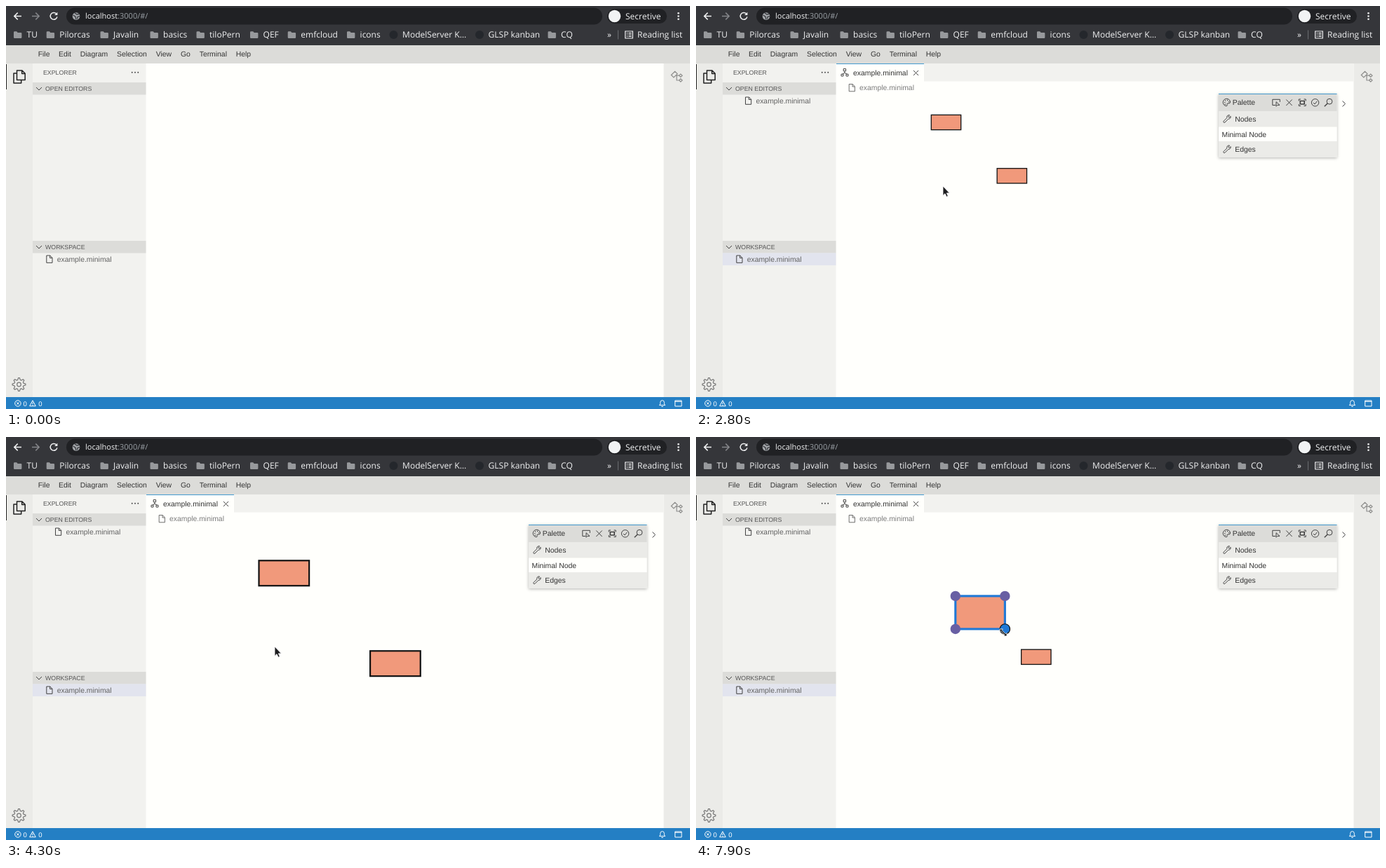
An HTML page that plays this animation: 975x575 px, repeating every 8000 ms.

```html
<!DOCTYPE html>
<html lang="en">
<head>
<meta charset="utf-8">
<title>Diagram editor</title>
<style>
  html, body { margin: 0; width: 100%; height: 100%; overflow: hidden; background: #fffffc; }
  svg.stage { display: block; width: 100vw; height: 100vh; }
  text { font: 10.4px "Liberation Sans", Arial, sans-serif; fill: #333; text-rendering: geometricPrecision; white-space: pre; }
  .chrome text { font: 12px "Open Sans", "Noto Sans", sans-serif; fill: #f1f2f3; }
  .chrome .url { font-size: 11px; }
  text.cap { font-size: 8.8px; fill: #555; }
  text.file { fill: #626262; }
  text.crumb { fill: #7c7c7c; }
  text.status { font-size: 9.6px; fill: #fff; }
  .line { fill: none; stroke: #424242; stroke-width: 1; }
  .head { fill: #dcdcd9; }
  .side { fill: #f2f2ef; }
  .bar { fill: #ebebe8; }
  .pick { fill: #e2e4ee; }
  .node { fill: #f1997b; stroke: #111; }
  .hidden { display: none; }
</style>
</head>
<body>
<svg class="stage" viewBox="0 0 975 575">
  <defs>
    <path id="folder" d="M0 1.2Q0 0 1.2 0H4.2L5.7 1.7H10.2Q11.4 1.7 11.4 2.9V8.6Q11.4 9.8 10.2 9.8H1.2Q0 9.8 0 8.6Z" fill="#97999c"/>
    <path id="page" class="line" stroke-linejoin="round" d="M.5 .5H5.5L8.7 3.7V10.8H.5ZM5.3 .7V4H8.5"/>
    <path id="chevron" class="line" d="M0 0L4 4L8 0"/>
    <g id="dots" fill="#424242"><circle r=".95"/><circle cx="4.3" r=".95"/><circle cx="8.6" r=".95"/></g>
    <path id="wrench" class="line" stroke-linejoin="round" d="M.6 9.3L5.3 4.6Q4.7 1.2 8.2 .6L9.1 .8L7.2 2.7L8.7 4.2L10.6 2.3Q11.2 5.7 7.2 6.3L2.4 11.1Q1 11.7 .4 10.7Q.2 9.9 .6 9.3Z"/>
    <filter id="shadow" x="-10%" y="-10%" width="120%" height="130%">
      <feDropShadow dx="0" dy="1" stdDeviation="2" flood-opacity=".3"/>
    </filter>
  </defs>

  <!-- browser -->
  <g class="chrome">
    <rect width="975" height="56" fill="#35363a"/>
    <rect x="86" y="2.5" width="764" height="24" rx="12" fill="#202124"/>
    <rect x="857" y="4" width="85" height="21" rx="10.5" fill="#202124"/>
    <g fill="none" stroke-width="1.5" stroke="#f1f2f3">
      <path d="M22 14.5H12M16.7 9.6L11.8 14.5L16.7 19.4"/>
      <path d="M37 14.5H47M42.3 9.6L47.2 14.5L42.3 19.4" stroke="#85868a"/>
      <path d="M71.6 10.9A4.9 4.9 0 1 0 72.9 15.4"/>
      <path d="M73.4 8.8V13.1H69.1Z" fill="#f1f2f3" stroke="none"/>
    </g>
    <circle cx="100" cy="14.5" r="5.3" fill="#a3a6aa"/>
    <path d="M95.6 13L99 15.2L99.8 18.8M98 10L101 12L104.5 11.4M101.5 18.5L102 15.5L105 14.6" fill="none" stroke="#34363a" stroke-width="1.3"/>
    <text class="url" x="113" y="18.3">localhost<tspan fill="#9aa0a6">:3000/#/</tspan></text>
    <circle cx="867.5" cy="14.5" r="8.7" fill="#f1f3f4"/>
    <text x="883" y="18.6">Secretive</text>
    <g fill="#f1f2f3"><circle cx="958.5" cy="10.3" r="1.3"/><circle cx="958.5" cy="14.5" r="1.3"/><circle cx="958.5" cy="18.7" r="1.3"/></g>
    <g id="marks"></g>
    <text x="857" y="45" font-weight="bold">»</text>
    <path d="M872.5 34.5V47.5" stroke="#6a6c70"/>
    <path d="M882.7 36H893.3V46H882.7ZM884.8 38.6H886M887.3 38.6H891.5M884.8 41H886M887.3 41H891.5M884.8 43.4H886M887.3 43.4H891.5" fill="none" stroke="#f1f2f3" stroke-width="1.2"/>
    <text x="900" y="45.2">Reading list</text>
  </g>

  <!-- workbench -->
  <rect y="56" width="975" height="26" class="head"/>
  <g id="menu"></g>
  <rect y="82" width="38" height="476" class="bar"/>
  <rect x="937.5" y="82" width="37.5" height="476" class="bar"/>
  <rect x="38" y="82" width="161.5" height="476" class="side"/>
  <path d="M.5 83V119" stroke="#222"/>
  <path d="M15.5 105.5V92H23L27.2 96.2V105.5ZM22.7 92V96.5H27M15.5 96H11V110H21.7V105.5" fill="none" stroke="#222" stroke-width="1.5" stroke-linejoin="round"/>
  <g fill="none" stroke="#777" stroke-width="1.2"><path id="gear"/><circle cx="18.5" cy="540" r="2.8"/></g>
  <path d="M948.3 98.5L953.5 93.3L957 96.8L951.8 102ZM954.6 99.2H959.5M956 99.2V106H959.5M959.5 99.2L961.7 97L964 99.2L961.7 101.4ZM959.5 106L961.7 103.8L964 106L961.7 108.2Z" fill="none" stroke="#8d8d8b" stroke-width="1.2"/>

  <text class="cap" x="53" y="97.7">EXPLORER</text>
  <use href="#dots" x="179.7" y="94.8"/>
  <rect x="38" y="109" width="161.5" height="17.5" class="head"/>
  <use href="#chevron" x="43" y="116"/>
  <text class="cap" x="56" y="121">OPEN EDITORS</text>
  <rect x="38" y="335" width="161.5" height="17.5" class="head"/>
  <use href="#chevron" x="43" y="342"/>
  <text class="cap" x="56" y="346.8">WORKSPACE</text>
  <rect id="fileRow" class="pick" x="38" y="352.5" width="161.5" height="17.5"/>
  <use href="#page" x="57.3" y="355.5"/>
  <text class="file" x="72.7" y="364.6">example.minimal</text>
  <g id="tools">
    <path class="line" d="M143.4 340.2A4.3 4.3 0 1 0 149.2 340.3M142 340H144.5V342.6"/>
    <path class="line" d="M163.2 342V339H170.3V346H168.3M161.5 341.6H168V348H161.5ZM163 344.8H166.5"/>
    <use href="#dots" x="180.7" y="343.8"/>
  </g>

  <g id="editor">
    <rect id="openRow" class="pick" x="38" y="126.5" width="161.5" height="17.5"/>
    <use href="#page" x="70" y="129.5"/>
    <text class="file" x="85.4" y="138.7">example.minimal</text>
    <rect x="325" y="82" width="612.5" height="25.5" class="side"/>
    <path d="M200 82.5H325" stroke="#439bd0"/>
    <path class="line" d="M210.2 89.6H213.6V92.8H210.2ZM211.9 93V95.3L208.8 97.2M211.9 95.3L215.2 97.2M207 97.2H210V100H207ZM214 97.2H217V100H214Z"/>
    <text x="224" y="98.6">example.minimal</text>
    <path class="line" d="M310 92L317 99M317 92L310 99"/>
    <use href="#page" x="217.7" y="111" opacity=".75"/>
    <text class="crumb" x="233" y="120.4">example.minimal</text>
  </g>

  <g id="diagram">
    <rect id="nodeB" class="node"/>
    <rect id="nodeA" class="node"/>
    <g id="handles"></g>
    <g filter="url(#shadow)">
      <rect x="745" y="125" width="168.5" height="91" class="bar"/>
    </g>
    <rect x="745" y="125" width="168.5" height="25" class="head"/>
    <rect x="745" y="172.5" width="168.5" height="20.5" fill="#fffffc"/>
    <path d="M745 125.5H913.5" stroke="#439bd0"/>
    <g class="line">
      <path d="M756.3 132.3A5.2 5.2 0 1 0 756.5 142.7Q758 142 756.8 140.6Q756.6 138.7 759 138.9Q761.6 139.2 761.6 137A5.2 5.2 0 0 0 756.3 132.3"/>
      <path d="M753.2 137.6H754.4M754 134.9H755.2M757 134.5H758.2M759 136.6H760.2M753.8 140.3H755" stroke-width="1.3"/>
      <path d="M826 141.5H821.8V133.3H832.3V137M827 136.7V143.2L828.8 141.4H832Z"/>
      <path d="M841.3 133.5L849.7 142M849.7 133.5L841.3 142"/>
      <path d="M859.3 135.5V133H862M866.5 133H869.2V135.5M869.2 140V142.5H866.5M862 142.5H859.3V140"/>
      <path d="M861.3 135.5H867.2V140H861.3Z" stroke-width="1.6"/>
      <circle cx="882.6" cy="137.8" r="5.2"/><path d="M880 138L882 140L885.4 135.8"/>
      <circle cx="903" cy="136.2" r="3.9"/><path d="M900.2 139L895.8 143.3" stroke-width="1.3"/>
      <path d="M921.5 135.5L925.5 139.5L921.5 143.5"/>
    </g>
    <text x="764.8" y="141.2">Palette</text>
    <use href="#wrench" x="751.5" y="155"/>
    <text x="768.3" y="164.8">Nodes</text>
    <text x="749.5" y="186.8">Minimal Node</text>
    <use href="#wrench" x="751.5" y="198.3"/>
    <text x="768.3" y="208.3">Edges</text>
  </g>

  <!-- status bar -->
  <rect y="558" width="975" height="17" fill="#247fc4"/>
  <g fill="none" stroke="#fff">
    <circle cx="16.9" cy="567" r="4.2"/><path d="M15.2 565.3L18.6 568.7M18.6 565.3L15.2 568.7"/>
    <path d="M38 562.8L42.3 570.8H33.7ZM38 565.5V568.2M38 569V570"/>
    <path d="M931.4 569.6H939.6L938.3 567.8V565.5A2.8 2.8 0 0 0 932.7 565.5V567.8ZM934.3 571.5H936.7"/>
    <path d="M953.7 563H963V571H953.7ZM953.7 564.3H963"/>
  </g>
  <text class="status" x="24.4" y="570.6">0</text>
  <text class="status" x="46.2" y="570.6">0</text>

  <!-- pointers -->
  <path id="arrow" d="M0 0V13.4L3 10.7L5.1 15.3L7.3 14.3L5.3 9.9H9.4Z" fill="#1d1d1f" stroke="#fff" stroke-width=".8"/>
  <path id="hand" d="M-.9 .6Q.3 -.8 1.3 .6V4.7L2.6 4.2L4 5L5.4 4.8L6.4 5.9L7.7 6.2V10L6.3 14H-.3L-4.3 9.2Q-4.8 7.8 -3.2 7.7L-.9 9.2Z" fill="#fff" stroke="#1d1d1f" stroke-width="1.1" stroke-linejoin="round"/>
  <path id="resize" d="M-5 -5H-.6L-2 -3.4L3.4 2L5 .6V5H.6L2 3.4L-3.4 -2L-5 -.6Z" fill="#111" stroke="#fff" stroke-width=".8"/>
</svg>
<script>
const LOOP = 8000, STEP = 100;
const W = 32.6, H = 16.35, GAP_X = 72.2, GAP_Y = 58.7;
const el = id => document.getElementById(id);
const show = (id, on) => el(id).classList.toggle('hidden', !on);

function add(parent, tag, attrs, content) {
  const node = document.createElementNS('http://www.w3.org/2000/svg', tag);
  set(node, attrs);
  if (content) node.textContent = content;
  return parent.appendChild(node);
}
function set(node, attrs) {
  for (const key in attrs) node.setAttribute(key, attrs[key]);
}

// static rows
[['TU', 11], ['Pilorcas', 57.7], ['Javalin', 134.5], ['basics', 205.5], ['tiloPern', 271.5], ['QEF', 348],
 ['emfcloud', 401.7], ['icons', 486], ['ModelServer K…', 546.5, 1], ['GLSP kanban', 669, 1], ['CQ', 772.5]
].forEach(([name, x, dot]) => {
  if (dot) add(el('marks'), 'circle', { cx: x + 6, cy: 41, r: 6, fill: '#24272c' });
  else add(el('marks'), 'use', { href: '#folder', x, y: 36.2 });
  add(el('marks'), 'text', { x: x + 18.6, y: 45.2 }, name);
});
[['File', 45.7], ['Edit', 75], ['Diagram', 105.8], ['Selection', 158], ['View', 213.7], ['Go', 249], ['Terminal', 275.7], ['Help', 327.7]]
  .forEach(([name, x]) => add(el('menu'), 'text', { x, y: 72.4 }, name));

const teeth = Array.from({ length: 32 }, (_, i) => {
  const a = (i - 1.5) * Math.PI / 16, r = i % 4 === 1 || i % 4 === 2 ? 9.4 : 6.7;
  return (18.5 + r * Math.cos(a)).toFixed(1) + ' ' + (540 + r * Math.sin(a)).toFixed(1);
});
el('gear').setAttribute('d', 'M' + teeth.join('L') + 'Z');

const handles = [0, 1, 2, 3].map(() => add(el('handles'), 'circle', { r: 7.2, fill: '#685fa3' }));

// time, x, y
const pointer = [
  [500, 2, 21], [600, 20, 85], [800, 76, 255], [1000, 112, 371], [1100, 119, 374], [1300, 117, 365], [1600, 117, 365],
  [2000, 210, 437], [2200, 311, 418], [2500, 350, 268], [2600, 352, 257], [2800, 352, 257], [3100, 357.5, 242],
  [3400, 357.5, 242], [3500, 360, 251], [3900, 392, 313.5], [4100, 383, 299], [5500, 383, 299], [5600, 382, 290],
  [5800, 376, 258.5], [6000, 372, 244], [6100, 372, 244], [6200, 372, 243], [6900, 372, 243], [7000, 382, 249],
  [7300, 410, 253], [7400, 410, 253], [7900, 438, 279]
];
// time, x, y, scale of the diagram
const view = [
  [1800, 339.2, 179.5, 1], [2600, 339.2, 179.5, 1], [2700, 335.3, 155.4, 1.3], [3400, 335.3, 155.4, 1.3],
  [3500, 337.8, 164.4, 1.3], [3900, 369.8, 226.9, 1.3], [4100, 369.8, 226.9, 1.3], [4200, 365.8, 204.8, 1.69],
  [4300, 360.5, 176.3, 2.197], [4900, 360.5, 176.3, 2.197], [5000, 365.8, 204.8, 1.69], [5200, 365.8, 204.8, 1.69],
  [5300, 369.8, 226.9, 1.3]
];
// time, extra width, extra height
const growth = [[7400, 0, 0], [7900, 28.2, 25.8]];

function at(keys, t) {
  const i = keys.findIndex(k => k[0] > t);
  if (i === 0) return keys[0].slice(1);
  if (i < 0) return keys[keys.length - 1].slice(1);
  const a = keys[i - 1], b = keys[i], p = (t - a[0]) / (b[0] - a[0]);
  return a.slice(1).map((v, n) => v + (b[n + 1] - v) * p);
}

function draw(t) {
  const [px, py] = at(pointer, t);
  const [x, y, s] = at(view, t);
  const [gw, gh] = at(growth, t);
  const w = W * s + gw, h = H * s + gh;
  const inPanel = t >= 500 && px > 38 && px < 199 && py > 335;
  const onFile = inPanel && py > 352 && py < 370;
  const hover = t >= 6000, selected = t >= 6500, resizing = t >= 7300;

  show('tools', inPanel);
  show('fileRow', onFile || t >= 1400);
  show('editor', t >= 1400);
  show('openRow', t < 1800);
  show('diagram', t >= 1800);
  show('handles', selected);

  set(el('nodeB'), { x: x + GAP_X * s, y: y + GAP_Y * s, width: W * s, height: H * s, 'stroke-width': s });
  set(el('nodeA'), { x, y, width: w, height: h });
  el('nodeA').style.stroke = hover ? '#2079d6' : '';
  el('nodeA').style.strokeWidth = s * (selected ? 2.4 : hover ? 1.8 : 1);
  handles.forEach((c, i) => set(c, { cx: x + (i % 2) * w, cy: y + (i >> 1) * h }));
  set(handles[3], resizing ? { fill: '#2079d6', stroke: '#111', 'stroke-width': 1.2 } : { fill: '#685fa3', stroke: 'none' });

  const kind = t < 500 ? '' : resizing ? 'resize' : onFile ? 'hand' : 'arrow';
  for (const id of ['arrow', 'hand', 'resize']) {
    show(id, id === kind);
    set(el(id), { transform: `translate(${px} ${py})` });
  }
}

const start = performance.now();
function tick() {
  const t = (performance.now() - start) % LOOP;
  draw(Math.floor(t / STEP) * STEP);
  requestAnimationFrame(tick);
}
draw(0);
requestAnimationFrame(tick);
</script>
</body>
</html>
```
